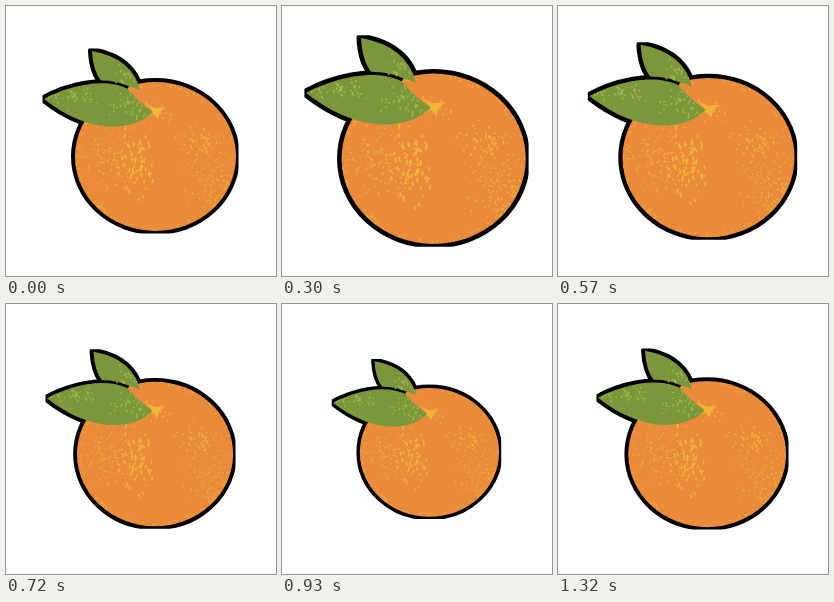
These frames come from a looping animation (270x270 px, 1.35 s). An HTML page:

```html
<!DOCTYPE html>
<html lang="en">
<head>
<meta charset="utf-8">
<title>Pulsing orange</title>
<style>
  html, body { margin: 0; width: 100%; height: 100%; overflow: hidden; background: #fff; }
  svg { display: block; width: 100%; height: 100%; }
</style>
</head>
<body>
<svg viewBox="0 0 270 270">
  <defs>
    <ellipse id="fruit" cx="149.500" cy="150.500" rx="80.500" ry="74.500"/>
    <path id="leaf" d="M38 93C58 82 96 70 122 83Q133 97 147 106C128 125 85 130 38 93Z"/>
    <path id="sprout" d="M86 45Q126 52 134 84Q120 78 96 76Q87 66 86 45Z"/>
    <clipPath id="frame"><rect x="36.500" y="42.500" width="196" height="185"/></clipPath>
    <clipPath id="inFruit"><use href="#fruit"/></clipPath>
    <clipPath id="inLeaves"><use href="#leaf"/><use href="#sprout"/></clipPath>
  </defs>
  <g id="art" clip-path="url(#frame)">
    <g stroke="#000" stroke-width="8" stroke-linejoin="round">
      <use href="#fruit"/><use href="#leaf"/><use href="#sprout"/>
    </g>
    <use href="#fruit" fill="#e98b3b"/>
    <g id="peel" clip-path="url(#inFruit)" stroke="#f0b637" stroke-linecap="round">
      <path d="M138 97L149 102L160 101L154 106L152 113L148 108L141 109L146 104Z" fill="#f0b637" stroke="none"/>
    </g>
    <use href="#sprout" fill="#7b973b"/>
    <path d="M38 91C58 81 96 69 122 82" fill="none" stroke="#000" stroke-width="3.500"/>
    <use href="#leaf" fill="#7b973b"/>
    <g id="veins" clip-path="url(#inLeaves)" stroke="#a3b94a" stroke-linecap="round"></g>
  </g>
</svg>
<script>
  const $ = id => document.getElementById(id);

  let seed = 7;
  const random = () => (seed = seed * 16807 % 2147483647) / 2147483647;
  const spread = () => (random() + random() + random() - 1.5) * 1.5;

  // Short upright dashes; place() returns the position of each one
  function dashes(group, count, grain, place) {
    let d = '';
    for (let i = 0; i < count; i++) {
      const [x, y] = place();
      const dx = (random() - 0.5) * 2, dy = (random() - 0.3) * grain * grain * 2;
      d += `M${x.toFixed(1)} ${y.toFixed(1)}l${dx.toFixed(1)} ${dy.toFixed(1)}`;
    }
    const path = document.createElementNS('http://www.w3.org/2000/svg', 'path');
    path.setAttribute('d', d);
    path.setAttribute('stroke-width', grain);
    $(group).append(path);
  }

  const cluster = (group, x, y, rx, ry, grain) =>
    dashes(group, rx * ry / 3, grain, () => [x + spread() * rx, y + spread() * ry]);

  cluster('peel', 130, 153, 9, 22, 1.7);
  cluster('peel', 103, 153, 22, 20, 1);
  cluster('peel', 194, 136, 13, 10, 1.2);
  cluster('peel', 208, 172, 18, 26, 1);
  cluster('peel', 151, 106, 9, 6, 1.2);
  dashes('peel', 90, 1, () => {
    const angle = random() * 2 * Math.PI, r = 1 - random() * 0.05;
    return [149.5 + 80 * r * Math.cos(angle), 150.5 + 74 * r * Math.sin(angle)];
  });
  cluster('veins', 125, 100, 14, 11, 1.2);
  cluster('veins', 74, 88, 12, 8, 1.2);
  cluster('veins', 46, 93, 8, 5, 1.2);
  cluster('veins', 122, 71, 10, 8, 1.2);

  const LOOP = 1350, STEP = 30;
  function draw(now) {
    const t = Math.floor(now % LOOP / STEP) * STEP;
    const scale = 1 + 0.146 * Math.sin(2 * Math.PI * t / LOOP);
    $('art').setAttribute('transform',
      `translate(134.5 135) scale(${scale}) translate(-134.5 -135)`);
  }

  const start = performance.now();
  function tick() {
    draw(performance.now() - start);
    requestAnimationFrame(tick);
  }
  tick();
</script>
</body>
</html>
```
